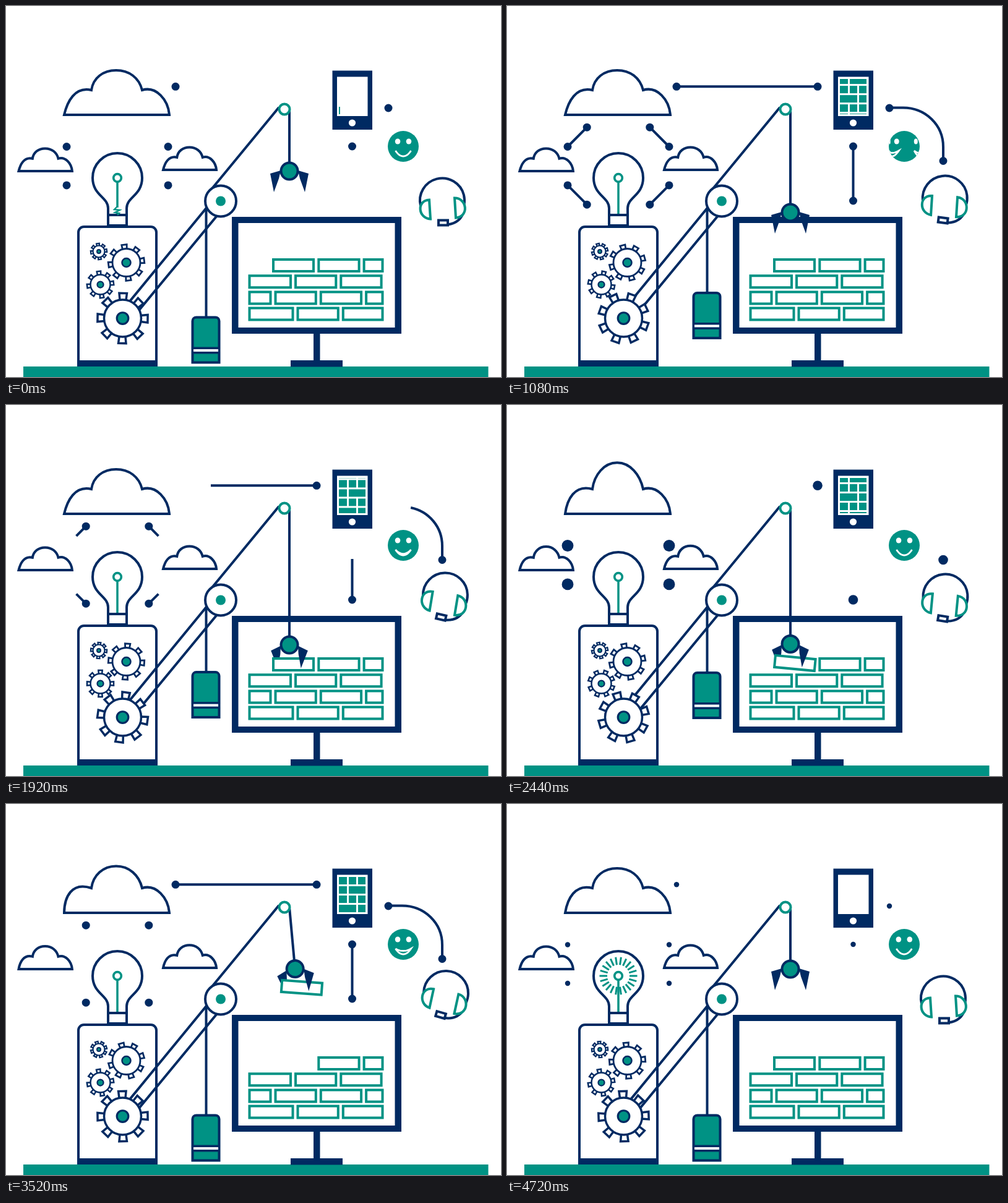
Write an HTML page with a canvas that moves like this. It is 800 by 600 pixels and loops after 4760 ms.

```html
<!DOCTYPE html>
<html lang="en">
<head>
<meta charset="utf-8">
<title>Workshop</title>
<style>
html, body { margin: 0; width: 100%; height: 100%; overflow: hidden; background: #fff; }
canvas { display: block; width: 800px; height: 600px; }
</style>
</head>
<body>
<canvas id="stage" width="800" height="600"></canvas>
<script>
const LOOP = 4760, STEP = 40;
const NAVY = '#002a62', TEAL = '#009284', WHITE = '#fff';
const TAU = Math.PI * 2;
const ctx = document.getElementById('stage').getContext('2d');

const clamp = (v, lo = 0, hi = 1) => Math.min(hi, Math.max(lo, v));
const mix = (a, b, k) => a + (b - a) * k;
const rad = deg => deg * Math.PI / 180;
const wrap = t => (t + LOOP) % LOOP;
const ease = k => k * k * (3 - 2 * k);

// 0 before start, 1 after end.
const ramp = (t, start, end) => clamp((t - start) / (end - start));
// Rises at on, falls back at off.
const hold = (t, on, off, time) => ramp(t, on, on + time) - ramp(t, off, off + time);
// One smooth bump between start and end.
const hump = (t, start, end) => Math.sin(Math.PI * ramp(t, start, end));

function paint(fill, stroke, width, path) {
  if (fill) {
    ctx.fillStyle = fill;
    path ? ctx.fill(path) : ctx.fill();
  }
  if (stroke) {
    ctx.strokeStyle = stroke;
    ctx.lineWidth = width;
    path ? ctx.stroke(path) : ctx.stroke();
  }
}

function circle(x, y, r, fill, stroke, width) {
  if (r <= 0) return;
  ctx.beginPath();
  ctx.arc(x, y, r, 0, TAU);
  paint(fill, stroke, width);
}

function rect(x, y, w, h, color) {
  ctx.fillStyle = color;
  ctx.fillRect(x, y, w, h);
}

function box(x, y, w, h, fill, stroke, radius = 0) {
  ctx.beginPath();
  ctx.roundRect(x, y, w, h, [radius, radius, 0, 0]);
  paint(fill, stroke, 4);
}

function line(x1, y1, x2, y2, color = NAVY, width = 4) {
  ctx.beginPath();
  ctx.moveTo(x1, y1);
  ctx.lineTo(x2, y2);
  paint(null, color, width);
}

function polygon(points, fill, stroke, width) {
  ctx.beginPath();
  points.forEach(([x, y]) => ctx.lineTo(x, y));
  ctx.closePath();
  paint(fill, stroke, width);
}

function at(x, y, deg, draw) {
  ctx.save();
  ctx.translate(x, y);
  ctx.rotate(rad(deg));
  draw();
  ctx.restore();
}

// Left corner of the base sits at (x, y).
function cloud(x, y, scale, t, swell) {
  const phase = TAU * t / (LOOP / 5);
  const lift = 12 * Math.pow(0.5 - 0.5 * Math.cos(phase), 3) * swell;
  const puff = 5 * Math.max(0, -Math.sin(phase)) * swell;
  const top = -72 - lift;
  const p = new Path2D();
  const c = (...v) => p.bezierCurveTo(...v.map((n, i) => n * scale + (i % 2 ? y : x)));
  p.moveTo(x, y);
  c(5 - puff, -21 - puff, 17 - puff, -46 - puff, 44, -40);
  c(47, -60 - lift * 0.3, 63, top, 84, top);
  c(105, top, 121, -60 - lift * 0.3, 126, -40);
  c(149, -47, 168, -24, 170, 0);
  p.closePath();
  paint(WHITE, NAVY, 4, p);
}

// Draws the part of a path between the fractions a and b.
function connector(d, length, a, b) {
  if (b - a < 0.001) return;
  ctx.save();
  ctx.setLineDash([0, a * length, (b - a) * length, 9999]);
  paint(null, NAVY, 4, new Path2D(d));
  ctx.restore();
}

// Radius of an end point shown from on to off, across the loop seam if needed.
const dotRadius = (t, on, off) => 6.5 * hold(wrap(t - on), 0, wrap(off - on), 100);

function longLinks(t) {
  const a = hold(t, 1800, 2600, 480);
  const b = hold(t, 40, 4080, 480);
  const startR = dotRadius(t, 4655, 1780) + dotRadius(t, 3040, 4550);
  const endR = dotRadius(t, 500, 4080) * (1 + 0.2 * hump(t, 2240, 2640));
  const links = [
    ['M274 130.3H502', 228, 274, 130.3, 502, 130.3],
    ['M618 164.5H640C676 164.5 705 192 705 228V250', 145, 618, 165, 705, 250.5],
    ['M559.5 227V315', 88, 559.5, 227, 559.5, 315]
  ];
  for (const [d, length, x1, y1, x2, y2] of links) {
    connector(d, length, a, b);
    circle(x1, y1, startR, NAVY);
    circle(x2, y2, endR, NAVY);
  }
}

function shortLinks(t) {
  const a = hold(t, 1400, 1780, 280) + hold(t, 3080, 3600, 280);
  const b = hold(t, 40, 2100, 400) + hold(t, 2560, 4340, 300);
  const outerR = (dotRadius(t, 4655, 1340) + dotRadius(t, 1960, 3080) + dotRadius(t, 3820, 4550))
    * (1 + 0.45 * hump(t, 2200, 2680) + 0.25 * hump(t, 440, 920));
  const innerR = dotRadius(t, 430, 2080) + dotRadius(t, 2820, 4320);
  for (const sx of [-1, 1]) for (const sy of [-1, 1]) {
    const x1 = 180 + 82 * sx, y1 = 258.7 + 31.2 * sy;
    const x2 = 180 + 50.8 * sx, y2 = 258.7 + 62.5 * sy;
    connector(`M${x1} ${y1}L${x2} ${y2}`, 44.2, a, b);
    circle(x1, y1, outerR, NAVY);
    circle(x2, y2, innerR, NAVY);
  }
}

function gear(x, y, angle, body, tip, half, width, hub) {
  for (let i = 0; i < 8; i++) {
    at(x, y, angle + i * 45, () => polygon(
      [[-half * 0.8, -body + 1], [-half, -tip], [half, -tip], [half * 0.8, -body + 1]],
      WHITE, NAVY, width));
  }
  circle(x, y, body, WHITE, NAVY, width);
  circle(x, y, hub, TEAL, NAVY, width * 0.9);
}

// The drive runs unevenly; meshing wheels turn against each other.
function gears(t) {
  const u = t / LOOP;
  const sway = 11 * Math.sin(TAU * u) - 10 * (1 - Math.cos(TAU * u));
  const forward = 1 + 270 * u + sway;
  const backward = -7 - 225 * u - sway;
  gear(150, 397, backward, 9.5, 13, 2.4, 2.2, 3);
  gear(194.5, 415, backward, 22.5, 29, 4.2, 2.8, 7);
  gear(152.5, 450.5, forward - 8, 16, 21.5, 3.2, 2.5, 5);
  gear(188.5, 505, forward, 30, 40.5, 6.2, 3.5, 9.3);
}

function bulb(t) {
  const glass = new Path2D('M165 338V327C165 309 140 306 140 278A40 40 0 0 1 220 278C220 306 195 309 195 327V338');
  paint(WHITE, NAVY, 4, glass);
  box(165, 338, 30, 17, WHITE, NAVY);
  line(180, 284, 180, 336, TEAL, 3.5);

  // Two flashes in a row: a spark climbs, then the rays light up.
  const since = wrap(t - 3800);
  const flash = since < 1920 ? since % 960 : 960;
  if (flash < 480) {
    at(180, mix(331, 288, ramp(flash, 0, 440)), 0, () => {
      rect(-2.5, -5, 5, 9, WHITE);
      ctx.beginPath();
      [[0, -7], [-5, -2], [4, -1], [-4, 3], [3, 4], [0, 7]].forEach(p => ctx.lineTo(...p));
      paint(null, TEAL, 2.3);
    });
  }
  circle(180, 278, 6.3, WHITE, TEAL, 3.7);

  const glow = hold(flash, 470, 920, 40);
  for (let i = 0; i < 22 && glow > 0; i++) {
    at(180, 278, i * 360 / 22, () => line(18, 0, 18 + 12.5 * glow, 0, TEAL, 3));
  }
}

function phone(t) {
  rect(527.5, 104.5, 64.5, 95.5, NAVY);
  rect(535, 114.5, 49.5, 63.5, WHITE);
  circle(559.5, 189, 5.6, WHITE);

  const filled = 4 * (ramp(t, -7, 640) - ramp(t, 3560, 4200));
  const scroll = 120 * ramp(t, 660, 3330) % 60;
  const rows = [[13, 12, 12], [13, 27], [13, 12, 12], [28, 12]];
  ctx.save();
  ctx.beginPath();
  ctx.rect(538, 118, 43.5, 57);
  ctx.clip();
  for (let i = 0; i < 8; i++) {
    const shown = 43.5 * clamp(filled - Math.max(0, 3 - i));
    let x = 0;
    for (const w of rows[i % 4]) {
      rect(538 + x, 118 + i * 15 - scroll, clamp(shown - x, 0, w), 12, TEAL);
      x += w + 3;
    }
  }
  ctx.restore();
}

// Three faces sit 120 degrees apart on a ball that turns in two eased spins.
function smiley(t) {
  const R = 25;
  const turn = 120 * (ease(ramp(t, 0, 1950)) + ease(ramp(t, 3700, LOOP)));
  const grin = hold(t, 200, 1700, 400) + hold(t, 2900, 3700, 400);
  const across = deg => R * Math.sin(rad(clamp(deg, -90, 90)));
  circle(642, 227, R, TEAL);
  ctx.save();
  ctx.clip();
  ctx.translate(642, 227);
  for (let copy = -3; copy <= 1; copy++) {
    const mid = turn + copy * 120;
    if (Math.abs(mid) > 85) continue;
    for (const side of [-21, 21]) {
      const squash = Math.max(0, Math.cos(rad(mid + side)));
      ctx.beginPath();
      ctx.ellipse(across(mid + side), -8, 4.6 * squash, 4.6, 0, 0, TAU);
      paint(WHITE);
    }
    const lip = (dir, depth) => {
      for (let u = -1; u <= 1; u += 0.125) {
        ctx.lineTo(across(mid + dir * u * 30), 7 + depth * (1 - u * u));
      }
    };
    ctx.beginPath();
    lip(1, 9);
    if (grin > 0) lip(-1, mix(9, 3.5, grin));
    paint(null, WHITE, 2.8);
  }
  ctx.restore();
}

// Nods three times, then rests.
function headset(t) {
  const nod = 0.5 - 0.5 * Math.cos(TAU * 3 * ramp(t, 0, 4240));
  at(705 + 6 * nod, 314.5 - 8.5 * nod, 16 * nod, () => {
    ctx.beginPath();
    ctx.arc(0, 0, 36, Math.PI - 0.25, 0.2);
    paint(null, NAVY, 4);
    paint(null, NAVY, 4, new Path2D('M35 17Q30 36 9 39'));
    paint(WHITE, TEAL, 4, new Path2D('M-21 -1L-19 30C-39 29 -42 0 -21 -1Z'));
    paint(WHITE, TEAL, 4, new Path2D('M20 -4C40 -4 44 26 22 28Z'));
    box(-6, 32, 15, 8, WHITE, NAVY);
  });
}

const brick = (x1, x2, y) => box(x1 + 2, y + 2, x2 - x1 - 4, 19, WHITE, TEAL);

function monitor() {
  rect(497, 528, 10.5, 46, NAVY);
  rect(460, 573, 84, 10.5, NAVY);
  rect(365, 341, 274, 189, NAVY);
  rect(375.5, 351, 253, 169, WHITE);
  const left = 391.5, right = 610.5, pitch = 73.3;
  [428, 464, 431.5, 467.5].forEach((joint, row) => {
    const y = 408 + row * 26.2;
    if (row > 0) brick(left, joint - 2, y);
    // The loose brick leaves the first place of the top row open.
    for (let x = joint + (row ? 0 : pitch); x < right; x += pitch) {
      brick(x + 2, Math.min(x + pitch - 2, right), y);
    }
  });
}

function craneArm(drop) {
  line(441, 164, 334, 294);
  line(326, 324, 198, 480);
  line(342, 338, 210, 498);

  const top = 503.5 - drop * 0.59;
  line(323.5, 326, 323.5, top);
  box(301.5, top, 43, 73, TEAL, NAVY, 6);
  rect(301, top + 48, 44, 11, NAVY);
  rect(303, top + 51.5, 40, 4, WHITE);
}

function claw(t, drop) {
  const calm = ramp(t, 3280, 4240);
  const swing = -7 * Math.sin(TAU * calm) * (1 - calm);
  const pinch = 10 * hold(t, 1600, 4260, 100);
  const tilt = ramp(t, 2400, 2470);
  const fall = ramp(t, 4320, 4560) ** 2;
  const held = t >= 2400 && t < 4320;
  const hang = draw => at(458, 167, swing, () => at(0, 100 + drop, 0, draw));
  const prong = side => {
    ctx.save();
    ctx.scale(side, 1);
    ctx.rotate(rad(-pinch));
    polygon([[-31, 4], [-14, -1], [-17, 12], [-25, 34]], NAVY);
    ctx.restore();
  };
  const looseBrick = () => brick(-34.5, 34.5, -11.5);

  hang(() => {
    line(0, -98 - drop, 0, -13);
    prong(1);
    if (held) at(mix(6.5, 8, tilt), 31, 9.5 * tilt, looseBrick);
  });
  if (!held) {
    const home = t < 2400 ? 1 : fall;
    at(mix(466, 464.5, home), mix(298, 419.5, home), 9.5 * (1 - home), looseBrick);
  }
  hang(() => {
    prong(-1);
    circle(0, 0, 13.5, TEAL, NAVY, 4);
  });
}

function draw(t) {
  const drop = 121 * (ramp(t, 520, 1532) - ease(ramp(t, 2380, 3280))) - 10 * hump(t, 3140, 3380);
  rect(0, 0, 800, 600, WHITE);
  rect(28, 583, 751.5, 17, TEAL);

  cloud(94, 176, 1, t, 1);
  cloud(20.5, 267, 0.508, t, 0.25);
  cloud(254, 265, 0.506, t, 0.15);
  shortLinks(t);
  longLinks(t);
  bulb(t);

  box(117, 357, 126, 222, WHITE, NAVY, 9);
  rect(115, 573, 130, 10, NAVY);

  phone(t);
  smiley(t);
  headset(t);
  monitor();
  craneArm(drop);
  gears(t);
  claw(t, drop);
  circle(347, 315.5, 25, WHITE, NAVY, 4);
  circle(347, 315.5, 8, TEAL);
  circle(450, 167, 8.5, WHITE, TEAL, 4);
}

const start = performance.now();
function frame() {
  const elapsed = performance.now() - start;
  draw(Math.floor(elapsed / STEP) * STEP % LOOP);
  requestAnimationFrame(frame);
}
frame();
</script>
</body>
</html>
```
